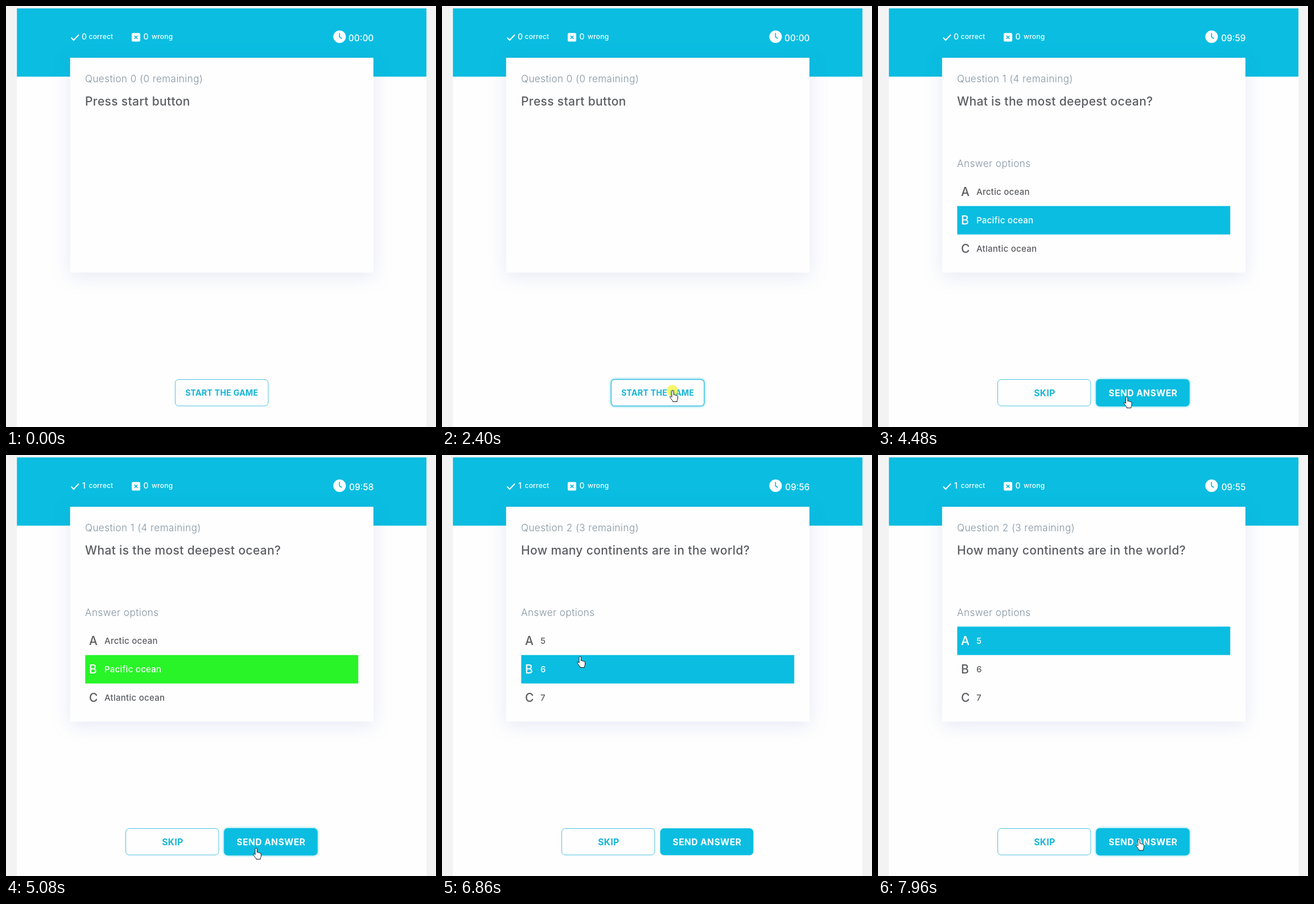
Animation, 756 px wide and 740 px high, one loop 8000 ms. Source, as an HTML page:

```html
<!DOCTYPE html>
<html lang="en">
<head>
<meta charset="utf-8">
<title>Quiz</title>
<style>
  html, body { margin: 0; width: 100%; height: 100%; overflow: hidden; background: #f3f3f3; }
  svg { display: block; width: 756px; height: 740px; font-family: Inter, "Open Sans", sans-serif; --cyan: #0abde1; }
  text { white-space: pre; }
  .cyan { fill: var(--cyan); }
  .card { fill: #fefefe; filter: drop-shadow(0 7px 16px rgba(85, 105, 200, .14)); }
  .light { font-size: 17px; font-weight: 300; letter-spacing: .48px; fill: #8293a0; }
  .title { font-size: 21px; font-weight: 450; letter-spacing: .35px; fill: #5b5d61; }
  .head { fill: #fff; font-weight: 500; font-size: 14px; }
  .head .word { font-size: 12px; letter-spacing: .2px; }
  .head .time { font-size: 15.4px; text-anchor: end; }
  .row rect { fill: none; }
  .row text { fill: #5b5d61; font-weight: 450; font-size: 15px; letter-spacing: .27px; }
  .row .key { font-size: 21px; letter-spacing: 0; }
  .row.on rect { fill: var(--cyan); }
  .row.right rect { fill: #28f428; }
  .row.on text, .row.right text { fill: #fff; }
  .btn rect { fill: #fefefe; stroke: #4cc3e2; stroke-width: 1; }
  .btn text { fill: #14b5d8; font-weight: 700; font-size: 15.5px; letter-spacing: .5px; text-anchor: middle; }
  #start text { font-size: 14.2px; letter-spacing: .25px; }
  #send rect { fill: var(--cyan); stroke: var(--cyan); }
  #send text { fill: #fff; }
  .btn.hover rect { stroke-width: 1.5; filter: drop-shadow(0 0 2px rgba(10, 189, 224, .75)); }
  #cursor path { fill: #fff; stroke: #17191c; stroke-width: 1; stroke-linejoin: round; }
</style>
</head>
<body>
<svg viewBox="0 0 756 740">
  <rect x="19.2" y="4.2" width="720" height="736" fill="#fefefe"/>
  <rect class="cyan" x="19.2" y="4.2" width="720" height="120"/>

  <g class="head">
    <path d="M114.5 55.5l4.5 4.5 9-9.5" fill="none" stroke="#fff" stroke-width="2"/>
    <text id="score" x="133" y="59">0</text>
    <text class="word" x="145.5" y="58">correct</text>
    <rect x="221" y="47.5" width="15" height="15" rx="2"/>
    <path d="M225.8 52.3l5.4 5.4m0-5.4l-5.4 5.4" stroke="#0abde0" stroke-width="1.7"/>
    <text x="241.5" y="59">0</text>
    <text class="word" x="256" y="58">wrong</text>
    <circle cx="586.5" cy="54" r="11"/>
    <path d="M586.3 47.5v6.7l4 3" fill="none" stroke="#0abde0" stroke-width="1.7"/>
    <text id="time" class="time" x="646.5" y="62">00:00</text>
  </g>

  <rect class="card" x="112.7" y="91" width="533.3" height="377.5"/>
  <text id="count" class="light" x="139" y="134"></text>
  <text id="title" class="title" x="139" y="175"></text>

  <g id="answers">
    <text class="light" x="139" y="283">Answer options</text>
  </g>

  <g id="start" class="btn">
    <rect x="297.5" y="656.5" width="163.5" height="46.5" rx="6"/>
    <text x="379.3" y="685">START THE GAME</text>
  </g>
  <g id="choice">
    <g class="btn">
      <rect x="210.5" y="656.5" width="163.5" height="46.5" rx="6"/>
      <text x="293" y="685.5">SKIP</text>
    </g>
    <g id="send" class="btn">
      <rect x="384" y="656.7" width="163" height="46.3" rx="6"/>
      <text x="466" y="685.5">SEND ANSWER</text>
    </g>
  </g>

  <circle id="click" r="10" fill="#f6f22e"/>
  <g id="cursor">
    <path id="hand" d="M-2 11.5V1.7a1.7 1.7 0 0 1 3.4 0V7.5q1.4-1 2.6.6 1.3-.8 2.3.7 2.2-.6 2.2 1.6V14q0 2-1.2 3.3v2.2H-.2V18q-2-1.6-3-3.8l-2-2.8q-.3-2 1.5-1.6z"/>
    <path id="arrow" d="M0 0v15l3.5-3.3 2.3 5.3 2.2-1-2.3-5.1h4.8z"/>
  </g>
</svg>
<script>
const LOOP = 8000, STEP = 70, APPEAR = 730;
const $ = id => document.getElementById(id);

const questions = [
  { count: "Question 0 (0 remaining)", title: "Press start button" },
  { count: "Question 1 (4 remaining)", title: "What is the most deepest ocean?",
    options: ["Arctic ocean", "Pacific ocean", "Atlantic ocean"] },
  { count: "Question 2 (3 remaining)", title: "How many continents are in the world?",
    options: ["5", "6", "7"] }
];

// A press takes effect two steps later, on release.
const press = { start: 2400, pacific: 3920, send: 4550, five: 7410 };
const release = name => press[name] + 2 * STEP;

// [start ms, value]
const question = [[0, 0], [release("start"), 1], [6250, 2]];
const score = [[0, 0], [release("send"), 1]];
const marks = [[0, ""], [release("pacific"), "1 on"], [release("send"), "1 right"],
  [6250, "1 on"], [release("five"), "0 on"]];

// Cursor moves: [from ms, to ms, x, y], each eased from the place before.
const home = [545, 700];
const moves = [
  [APPEAR, 1210, 406, 676],
  [3360, 3850, 252, 379],
  [4200, 4500, 440, 691],
  [5020, 5290, 430, 661],
  [5430, 5900, 238.5, 364.5],
  [6580, 7270, 251, 335.5],
  [7620, 7960, 459, 675.5]
];

const at = (list, t) => list.filter(e => e[0] <= t).pop()[1];
const show = (el, on) => el.style.display = on ? "" : "none";
const inside = (x, y, l, t, r, b) => x >= l && x <= r && y >= t && y <= b;
const setText = (el, s) => { if (el.textContent !== String(s)) el.textContent = s; };
const smooth = k => k * k * (3 - 2 * k);

function make(tag, parent, attrs, text = "") {
  const el = document.createElementNS("http://www.w3.org/2000/svg", tag);
  for (const k in attrs) el.setAttribute(k, attrs[k]);
  el.textContent = text;
  return parent.appendChild(el);
}

const rows = ["A", "B", "C"].map((key, i) => {
  const y = 301.6 + i * 50;
  const g = make("g", $("answers"), { class: "row" });
  make("rect", g, { x: 139.3, y, width: 480, height: 50 });
  make("text", g, { class: "key", x: 146, y: y + 32.7 }, key);
  return { g, label: make("text", g, { x: 173, y: y + 30.3 }) };
});

// Ten minutes count down from the start of the game.
function clock(t) {
  const begun = release("start") + 40;
  if (t < release("start")) return "00:00";
  const left = 600 - Math.max(0, Math.floor((t - begun) / 1000));
  const two = n => String(n).padStart(2, "0");
  return two(Math.floor(left / 60)) + ":" + two(left % 60);
}

function tip(t) {
  let [x, y] = home;
  for (const [from, to, x1, y1] of moves) {
    if (t < from) break;
    const held = t < to ? Math.floor((t - from) / STEP) * STEP : to - from;
    const k = smooth(held / (to - from));
    x += (x1 - x) * k;
    y += (y1 - y) * k;
  }
  return [x, y];
}

function drawCursor(t, playing) {
  const [x, y] = tip(t);
  const visible = t >= APPEAR;
  const onStart = visible && !playing && inside(x, y, 297, 656, 461, 704);
  const onSend = playing && inside(x, y, 384, 656, 547, 704);
  const onRow = playing && inside(x, y, 139, 302, 619, 452);
  const pointing = onStart || onSend || onRow;
  $("start").classList.toggle("hover", onStart);
  $("send").classList.toggle("hover", onSend);
  show($("cursor"), visible);
  show($("hand"), pointing);
  show($("arrow"), !pointing);
  $("cursor").setAttribute("transform", `translate(${x} ${y})`);

  const age = Math.min(...Object.values(press).filter(p => p <= t).map(p => t - p));
  const click = $("click");
  show(click, age < 3 * STEP);
  click.setAttribute("cx", x - 1);
  click.setAttribute("cy", y);
  click.setAttribute("opacity", age < 2 * STEP ? .7 : .35);
}

function draw(t) {
  const n = at(question, t), q = questions[n];
  const playing = n > 0;
  setText($("count"), q.count);
  setText($("title"), q.title);
  setText($("time"), clock(t));
  const points = at(score, t);
  setText($("score"), points);
  $("score").setAttribute("x", points ? 134 : 133);
  show($("answers"), playing);
  show($("choice"), playing);
  show($("start"), !playing);

  const [marked, look] = at(marks, t).split(" ");
  rows.forEach((row, i) => {
    if (playing) setText(row.label, q.options[i]);
    row.g.setAttribute("class", "row " + (marked === String(i) ? look : ""));
  });

  drawCursor(t, playing);
}

const begin = performance.now();
function frame() {
  draw((performance.now() - begin) % LOOP);
  requestAnimationFrame(frame);
}
frame();
</script>
</body>
</html>
```
